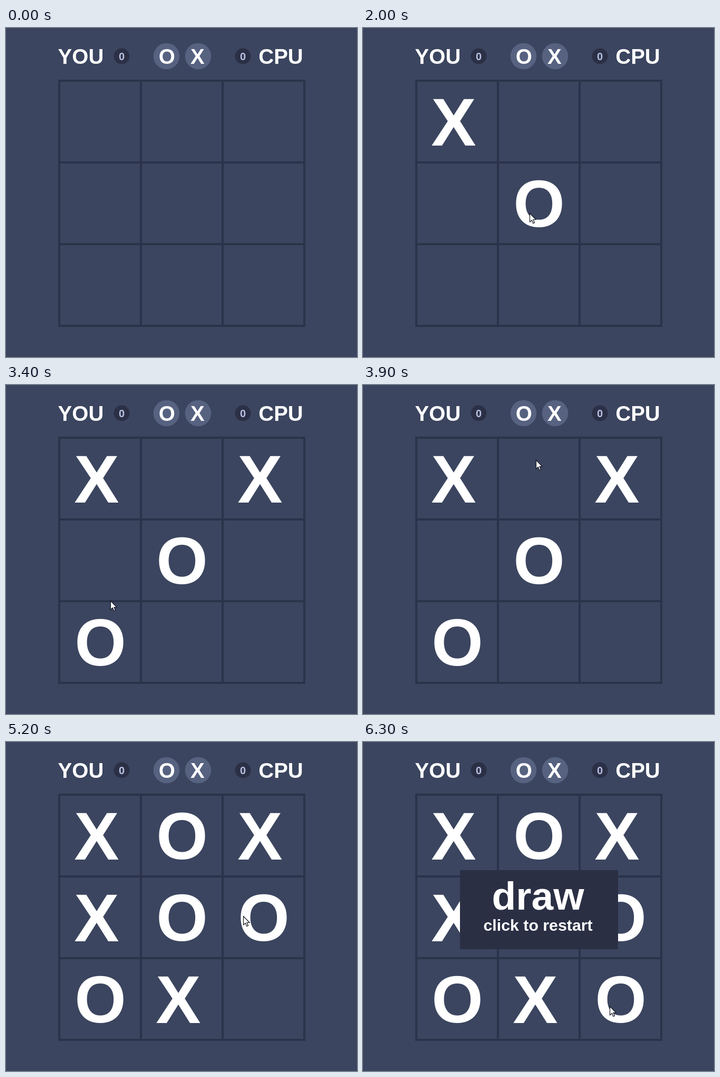
An HTML page with a canvas that plays this animation: 666 by 624 pixels, repeating every 7.2 s.

```html
<!DOCTYPE html>
<html lang="en">
<head>
<meta charset="utf-8">
<title>Noughts and crosses</title>
<style>
  html, body { margin: 0; width: 100%; height: 100%; overflow: hidden; background: #3b455f; }
  canvas { display: block; }
</style>
</head>
<body>
<canvas id="stage" width="666" height="624"></canvas>
<script>
const ctx = document.getElementById("stage").getContext("2d");
const LOOP = 7200, STEP = 100, CELL = 155;
const END_TIME = 6300;

// Centre, baseline and size of each mark in the top left cell.
const marks = {
  X: { x: 172, y: 222.8, size: 128 },
  O: { x: 179, y: 221.7, size: 125.5 }
};

const moves = [
  { mark: "X", at: 1400, col: 0, row: 0 },
  { mark: "O", at: 1400, col: 1, row: 1 },
  { mark: "O", at: 2700, col: 0, row: 2 },
  { mark: "X", at: 2700, col: 2, row: 0 },
  { mark: "O", at: 4000, col: 1, row: 0 },
  { mark: "X", at: 4000, col: 1, row: 2 },
  { mark: "O", at: 5200, col: 2, row: 1 },
  { mark: "X", at: 5200, col: 0, row: 1 },
  { mark: "O", at: 6300, col: 2, row: 2 }
];

const smooth = u => u * u * (3 - 2 * u);
const slowDown = u => 1 - (1 - u) ** 1.3;

// The pointer glides between these stops.
const glides = [
  { start: 400, end: 1200, from: [650, 612], to: [317, 352], ease: slowDown },
  { start: 2200, end: 2600, from: [317, 352], to: [167, 476], ease: smooth },
  { start: 3200, end: 3900, from: [167, 476], to: [329, 143], ease: smooth },
  { start: 4500, end: 5100, from: [329, 143], to: [451, 331], ease: smooth },
  { start: 5700, end: 6200, from: [451, 331], to: [469, 502], ease: smooth }
];

const arrow = new Path2D("M0 0V16.5L3.8 13L6.3 19L9 17.9L6.5 12H11.6Z");

function text(string, x, y, size, color = "#fff", align = "center") {
  ctx.font = `bold ${size}px "Liberation Sans", Arial, sans-serif`;
  ctx.textAlign = align;
  ctx.fillStyle = color;
  ctx.fillText(string, x, y);
}

function disc(x, radius, color) {
  ctx.fillStyle = color;
  ctx.beginPath();
  ctx.arc(x, 53.5, radius, 0, 2 * Math.PI);
  ctx.fill();
}

function drawHeader() {
  text("YOU", 98.6, 68, 40, "#fff", "left");
  text("CPU", 479.3, 68, 40, "#fff", "left");
  for (const x of [219.5, 449.5]) {
    disc(x, 15, "#2b3046");
    text("0", x, 60.5, 20, "#b9c1e2");
  }
  disc(304.5, 24.8, "#566280");
  disc(364.5, 24.8, "#566280");
  text("O", 305.2, 68, 40);
  text("X", 363.3, 68, 40);
}

function drawGrid() {
  ctx.fillStyle = "#2a3349";
  for (let i = 0; i < 4; i++) {
    ctx.fillRect(99 + i * CELL, 98, 4, 469);
    ctx.fillRect(99, 98 + i * CELL, 469, 4);
  }
}

function drawResult() {
  ctx.fillStyle = "#2a2f44";
  ctx.fillRect(184, 243, 300, 150);
  text("draw", 244.5, 318, 75, "#fff", "left");
  text("click to restart", 228.5, 358, 30.3, "#fff", "left");
}

function drawPointer(time) {
  const glide = glides.filter(g => g.start <= time).pop();
  if (!glide) return;
  const progress = glide.ease(Math.min(1, (time - glide.start) / (glide.end - glide.start)));
  const [x, y] = glide.from.map((a, i) => Math.round(a + (glide.to[i] - a) * progress));
  ctx.save();
  ctx.translate(x - 0.5, y - 0.5);
  ctx.fillStyle = "#fff";
  ctx.strokeStyle = "#111521";
  ctx.lineWidth = 1.2;
  ctx.fill(arrow);
  ctx.stroke(arrow);
  ctx.restore();
}

function render(now) {
  const time = Math.floor((now % LOOP) / STEP) * STEP;
  ctx.fillStyle = "#3b455f";
  ctx.fillRect(0, 0, 666, 624);
  drawHeader();
  drawGrid();
  for (const { mark, at, col, row } of moves) {
    const { x, y, size } = marks[mark];
    if (time >= at) text(mark, x + col * CELL, y + row * CELL, size);
  }
  if (time >= END_TIME) drawResult();
  drawPointer(time);
}

const begin = performance.now();
function tick() {
  render(performance.now() - begin);
  requestAnimationFrame(tick);
}
tick();
</script>
</body>
</html>
```
